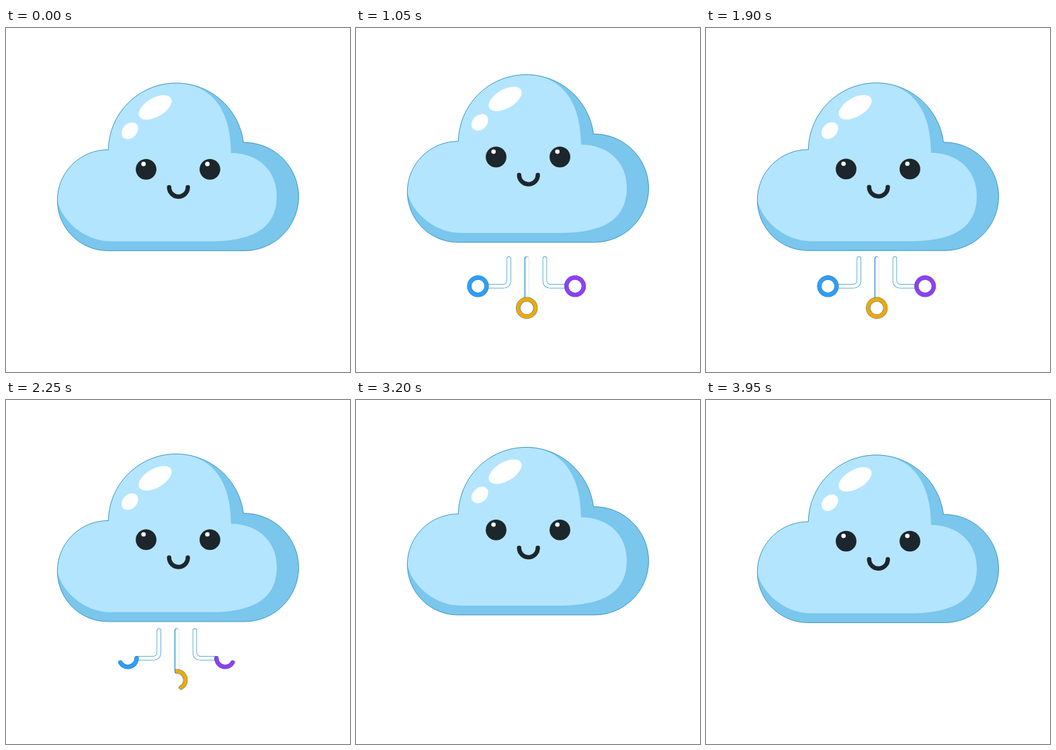
An HTML page for the animation above (4000 ms loop, 512 by 512 pixels).

```html
<!DOCTYPE html>
<html lang="en">
<head>
<meta charset="utf-8">
<title>Happy cloud</title>
<style>
  html, body { margin: 0; width: 100%; height: 100%; overflow: hidden; background: #fff; }
  svg { display: block; width: 100%; height: 100%; }
  #wires, #rings { fill: none; stroke-linecap: round; }
</style>
</head>
<body>
<svg viewBox="0 0 512 512">
  <defs>
    <path id="outline" d="M152.3 181.2A101 101 0 0 1 353.5 170.3A81 81 0 0 1 435.6 251A80.6 80.6 0 0 1 355 331.5
      H151.7A75.3 75.3 0 0 1 76.4 256.3A75.3 75.3 0 0 1 152.3 181.2Z"/>
  </defs>
  <g id="wires"></g>
  <g id="rings"></g>
  <g id="cloud">
    <use href="#outline" fill="#7ac6ed"/>
    <path fill="#b3e5ff"
      d="M152.3 181.2A101 101 0 0 1 253 82.2C312 83 335 130 335 186C375 186 403 212 403 250
         C403 300 365 316 310 317.5H155C115 317 82 285 76.4 256.3A75.3 75.3 0 0 1 152.3 181.2Z"/>
    <use href="#outline" fill="none" stroke="#2584b5" stroke-width=".8"/>
    <g fill="#fff">
      <ellipse rx="27.2" ry="14" transform="translate(222 118.2) rotate(-30)"/>
      <ellipse rx="14" ry="10.5" transform="translate(184.3 153) rotate(-45)"/>
    </g>
  </g>
  <g id="face" fill="#1c262c">
    <circle cx="208.5" cy="210.3" r="15.4"/>
    <circle cx="303.5" cy="210.3" r="15.4"/>
    <circle cx="204.7" cy="202.4" r="3.3" fill="#fff"/>
    <circle cx="299.7" cy="202.4" r="3.3" fill="#fff"/>
    <path d="M242.8 237a13.9 13.9 0 0 0 27.8 0" fill="none" stroke="#1c262c" stroke-width="6.5" stroke-linecap="round"/>
  </g>
</svg>
<script>
const LOOP = 4000;
const $ = id => document.getElementById(id);
const clamp = v => Math.max(0, Math.min(1, v));

// Stacks a coloured rim and a body stroke; both are trimmed together.
function addStroke(parent, d, strokes, times) {
  const paths = strokes.map(([color, width, shift = 0]) => {
    const p = document.createElementNS('http://www.w3.org/2000/svg', 'path');
    const attrs = { d, stroke: color, 'stroke-width': width, pathLength: 1, transform: `translate(${shift} 0)` };
    for (const k in attrs) p.setAttribute(k, attrs[k]);
    return parent.appendChild(p);
  });
  return { paths, times };
}

const wire = (d, inEnd, shift) =>
  addStroke($('wires'), d, [['#2b90c6', 6.4], ['#fff', 5, shift]], [40, inEnd, 2710, 3200]);

// Half circles of radius 12.9, starting where the wire arrives
const ring = (x, y, dx, dy, sweep, color, start) => {
  const half = s => `a12.9 12.9 0 0 ${sweep} ${s * dx} ${s * dy}`;
  return addStroke($('rings'), `M${x} ${y}${half(1)}${half(-1)}`,
    [['#28719c', 6.5], [color, 5.6]], [start, start + 500, 1960, 2460]);
};

const strokes = [
  wire('M227.6 343.3V375.2Q227.6 384.3 218.5 384.3H196', 540, 0),
  wire('M254 343.3V404', 490, .6),
  wire('M281 343.3V375.2Q281 384.3 290 384.3H313', 540, 0),
  ring(194.4, 384.3, -25.8, 0, 1, '#2e9ef8', 560),
  ring(254.2, 403.8, 0, 25.8, 1, '#f0a808', 490),
  ring(313.2, 384.3, 25.8, 0, 0, '#933df6', 560)
];

// Cubic easing with control points (.42, 0) and (.58, 1)
function easeInOut(x) {
  let s = x;
  for (let i = 0; i < 5; i++)
    s -= (1.26 * s - .78 * s * s + .52 * s ** 3 - x) / (1.26 - 1.56 * s + 1.56 * s * s);
  return s * s * (3 - 2 * s);
}

function trim({ paths, times: [a, b, c, d] }, t) {
  const part = clamp((t - a) / (b - a)) - clamp((t - c) / (d - c));
  for (const p of paths) {
    p.style.display = part > 0 ? '' : 'none';
    p.setAttribute('stroke-dasharray', part > .999 ? 'none' : `${part} 2`);
  }
}

function draw(now) {
  const t = now % LOOP;
  const lift = easeInOut(1 - Math.abs(t % 2000 / 1000 - 1));
  $('cloud').setAttribute('transform', `translate(0 ${-12.6 * lift})`);
  $('face').setAttribute('transform', `translate(0 ${-18.4 * lift})`);
  strokes.forEach(s => trim(s, t));
}

const begin = performance.now();
function tick() {
  draw(performance.now() - begin);
  requestAnimationFrame(tick);
}
tick();
</script>
</body>
</html>
```
